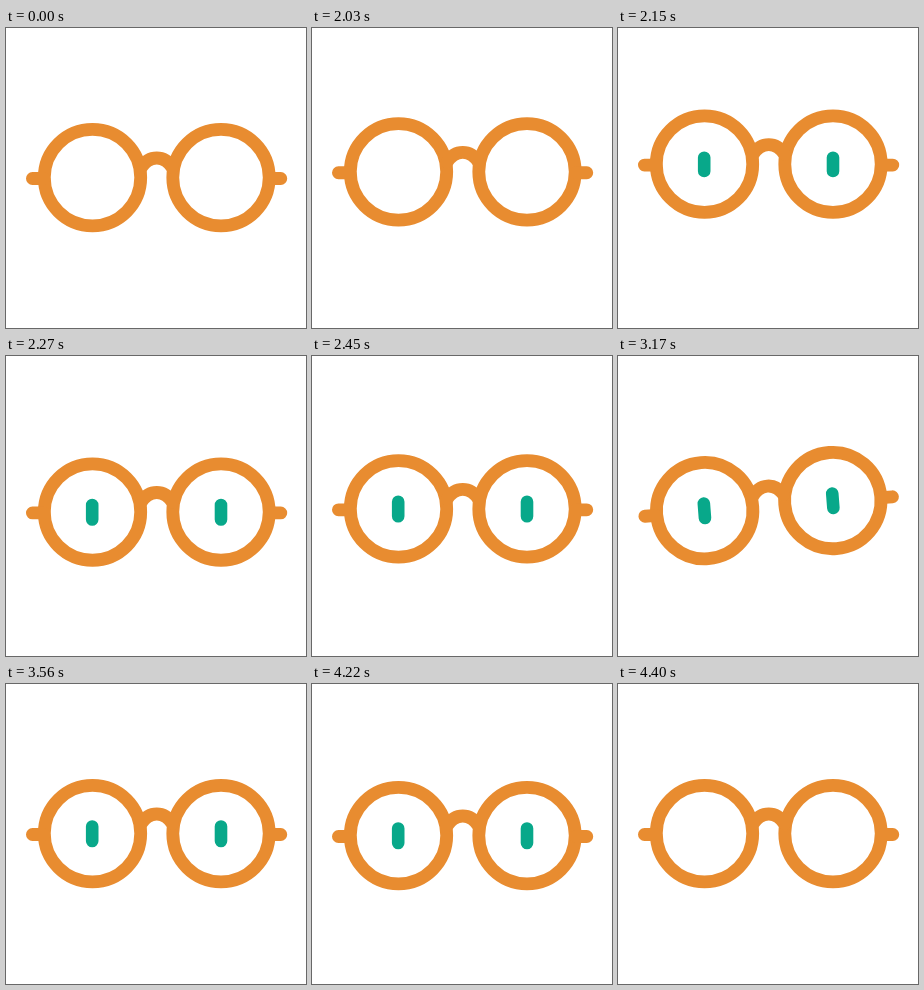
Recreate the animation shown at these times as an HTML page. Size 300 by 300 pixels, loop 4430 ms.

```html
<!DOCTYPE html>
<html lang="en">
<head>
<meta charset="utf-8">
<title>Glasses</title>
<style>
  html, body { margin: 0; width: 100%; height: 100%; overflow: hidden; background: #fff; }
  svg { display: block; width: 100%; height: 100%; }
  .frame { fill: none; stroke: #e88c30; stroke-width: 12.8; stroke-linecap: round; }
  .eye { stroke: #08a88a; stroke-width: 12.6; stroke-linecap: round; }
</style>
</head>
<body>
<svg viewBox="0 0 300 300">
  <g id="glasses">
    <g class="frame">
      <circle cx="86.5" cy="149.6" r="48.2"/>
      <circle cx="215" cy="149.6" r="48.2"/>
      <path d="M135 140C143 126.7 158.5 126.7 166.5 140M26.4 150.5H38M263.5 150.5H274.8"/>
    </g>
    <g id="eyes">
      <path class="eye" d="M86.2 142.5V157M215 142.5V157"/>
    </g>
  </g>
</svg>
<script>
  const LOOP = 4430, STEP = 30, PHASE = 20;
  const glasses = document.getElementById('glasses');
  const eyes = document.getElementById('eyes');

  const inOut = p => (1 - Math.cos(Math.PI * p)) / 2;
  const out = p => Math.sin(Math.PI * p / 2);
  const linear = p => p;
  const soft = p => (inOut(p) + out(p)) / 2;

  // Each key: time, value, easing towards that value
  const lift = [
    [2000, 0], [2120, -15, out], [2300, 8, inOut], [2570, 0, inOut],
    [4040, 0], [4130, -4, inOut], [4310, 8, inOut], [4400, 0, inOut]
  ];
  const tilt = [[2930, 0], [3170, -4.5, soft], [3350, -4.5], [3560, 0, inOut]];
  const open = [[2030, 0], [2180, 1, out], [4220, 1], [4340, 0, inOut]];

  function at(keys, t) {
    if (t <= keys[0][0]) return keys[0][1];
    for (let i = 1; i < keys.length; i++) {
      const [t0, v0] = keys[i - 1];
      const [t1, v1, ease = linear] = keys[i];
      if (t < t1) return v0 + (v1 - v0) * ease((t - t0) / (t1 - t0));
    }
    return keys[keys.length - 1][1];
  }

  function draw(now) {
    const ms = now % LOOP;
    const t = Math.floor((ms - PHASE) / STEP) * STEP + PHASE;
    const size = at(open, t);
    glasses.setAttribute('transform',
      `translate(0 ${at(lift, t)}) rotate(${at(tilt, t)} 150.7 149.7)`);
    eyes.setAttribute('transform', `translate(0 149.75) scale(1 ${size}) translate(0 -149.75)`);
    eyes.setAttribute('visibility', size > 0 ? 'visible' : 'hidden');
  }

  const start = performance.now();
  function tick() {
    draw(performance.now() - start);
    requestAnimationFrame(tick);
  }
  tick();
</script>
</body>
</html>
```
